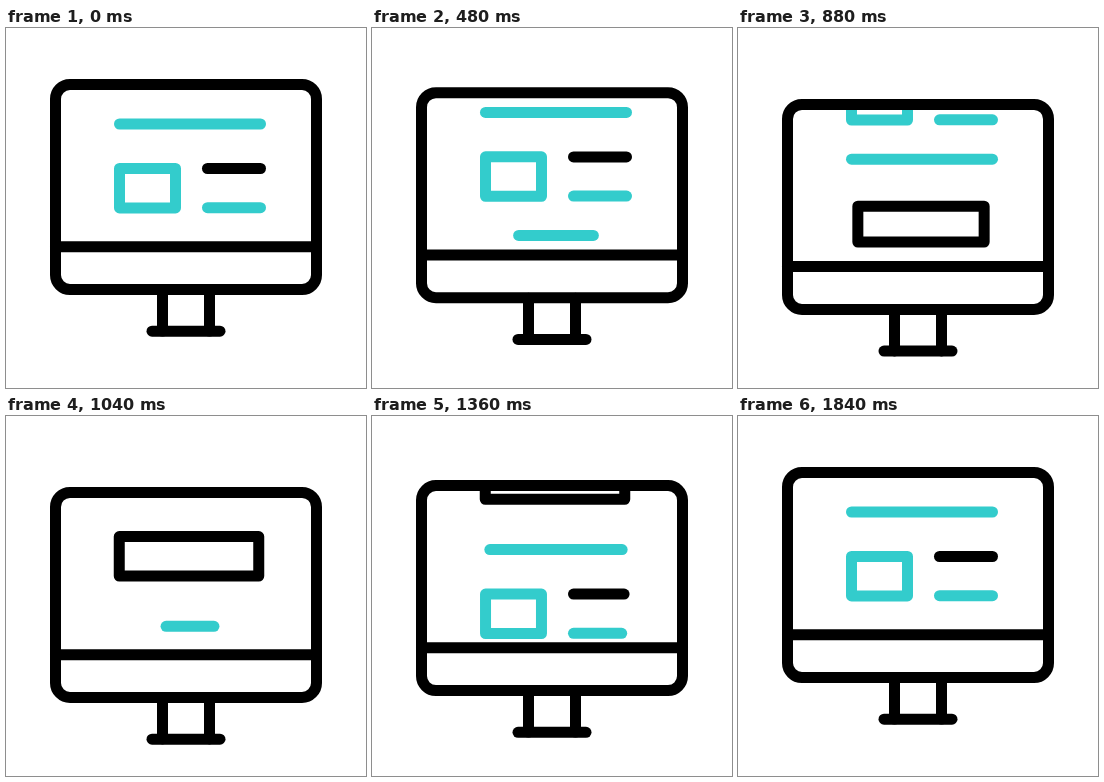
An HTML page with a canvas that plays this animation: 360x360 px, repeating every 1.88 s.

```html
<!DOCTYPE html>
<html lang="en">
<head>
<meta charset="utf-8">
<title>Scrolling monitor</title>
<style>
  html, body { margin: 0; width: 100%; height: 100%; overflow: hidden; background: #fff; }
  canvas { display: block; width: 100vw; height: 100vh; }
</style>
</head>
<body>
<canvas id="stage"></canvas>
<script>
const SIZE = 360, LOOP = 1880, STEP = 40, END = 1800;
const PEAK = 940, DROP = 20, PERIOD = 258;
const TEAL = '#33cccc', BLACK = '#000';

const canvas = document.getElementById('stage');
const ctx = canvas.getContext('2d');
const ratio = window.devicePixelRatio || 1;
canvas.width = canvas.height = SIZE * ratio;

const clamp = x => Math.min(1, Math.max(0, x));
const cubic = x => x < 0.5 ? 4 * x ** 3 : 1 - 4 * (1 - x) ** 3;
const smooth = x => x * x * (3 - 2 * x);
const grow = (t, start) => smooth(clamp((t - start) / 700));

// cubic-bezier(.6, 0, .4, 1)
function bezier(x) {
  let lo = 0, hi = 1;
  for (let i = 0; i < 24; i++) {
    const u = (lo + hi) / 2, v = 1 - u;
    if (1.8 * u * v * v + 1.2 * u * u * v + u ** 3 < x) lo = u;
    else hi = u;
  }
  return smooth(lo);
}

function line(color, x1, y1, x2, y2) {
  ctx.strokeStyle = color;
  ctx.beginPath();
  ctx.moveTo(x1, y1);
  ctx.lineTo(x2, y2);
  ctx.stroke();
}

function centredLine(color, y, k) {
  if (k > 0) line(color, 184 - 70.5 * k, y, 184 + 70.5 * k, y);
}

function leftLine(color, y, k) {
  if (k > 0) line(color, 201.5, y, 201.5 + 53 * k, y);
}

function box(color, cx, cy, w, h, k) {
  if (k <= 0) return;
  ctx.strokeStyle = color;
  ctx.strokeRect(cx - w * k / 2, cy - h * k / 2, w * k, h * k);
}

function block(y, bar, frame, upper, lower) {
  centredLine(TEAL, y + 96, bar);
  box(TEAL, 141.5, y + 160.2, 56, 39.5, frame);
  leftLine(BLACK, y + 140.5, upper);
  leftLine(TEAL, y + 179.7, lower);
}

function page(t) {
  block(0, 1, 1, 1, 1);
  centredLine(TEAL, 219, grow(t, 76));
  box(BLACK, 183, 284, 139.5, 39.5, grow(t, 273));
  block(PERIOD, grow(t, 726), grow(t, 633), grow(t, 710), grow(t, 750));
}

function monitor() {
  ctx.strokeStyle = BLACK;
  ctx.beginPath();
  ctx.roundRect(49.5, 56.5, 261, 205, 14.5);
  ctx.stroke();
  line(BLACK, 49.5, 218.7, 310.5, 218.7);
  line(BLACK, 156.5, 262, 156.5, 303);
  line(BLACK, 203.5, 262, 203.5, 303);
  line(BLACK, 146, 303.2, 214, 303.2);
}

function draw(t) {
  const drop = DROP * (t < PEAK ? cubic(t / PEAK) : 1 - cubic((t - PEAK) / (END - PEAK)));
  const scroll = PERIOD * bezier(t / END);

  ctx.setTransform(ratio, 0, 0, ratio, 0, 0);
  ctx.fillStyle = '#fff';
  ctx.fillRect(0, 0, SIZE, SIZE);
  ctx.lineWidth = 11;
  ctx.lineCap = ctx.lineJoin = 'round';
  ctx.translate(0, drop);

  ctx.save();
  ctx.beginPath();
  ctx.rect(52, 58, 256, 160);
  ctx.clip();
  ctx.translate(0, -scroll);
  page(t);
  ctx.restore();

  monitor();
}

const begin = performance.now();

function tick() {
  const ms = (performance.now() - begin) % LOOP;
  const t = Math.floor(ms / STEP) * STEP - STEP;
  draw(Math.min(END, Math.max(0, t)));
  requestAnimationFrame(tick);
}

tick();
</script>
</body>
</html>
```
